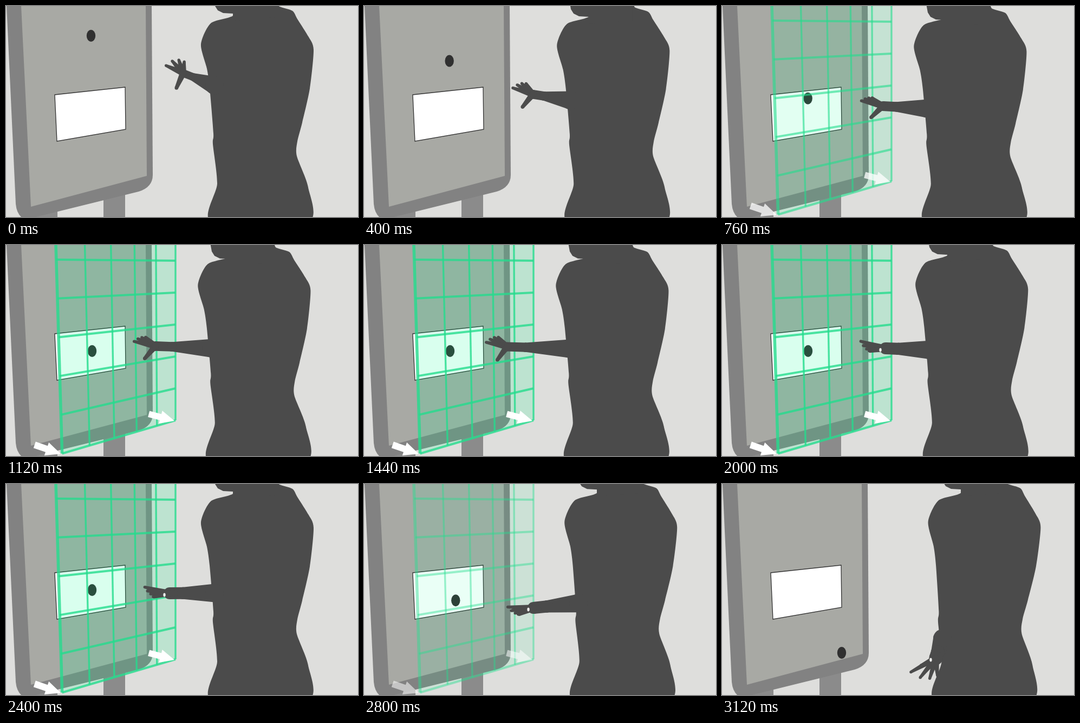
Animation, 650 px wide and 390 px high, one loop 3.16 s. Source, as an HTML page with a canvas:

```html
<!DOCTYPE html>
<html lang="en">
<head>
<meta charset="utf-8">
<title>Touchless board</title>
<style>
html, body { margin: 0; width: 100%; height: 100%; overflow: hidden; background: #dededc; }
canvas { display: block; }
</style>
</head>
<body>
<canvas id="stage" width="650" height="390"></canvas>
<script>
const ctx = document.getElementById('stage').getContext('2d');
const LOOP = 3160, STEP = 40;
const DARK = '#4b4b4b';

// time, body lean, palm x, palm y, hand tilt, finger spread (degrees; negative curls the fingers)
const poses = [
  [0, 0, 327, 124, 24, 24],
  [760, -6, 297, 185, 14, 8],
  [1440, -6, 264, 188, 12, 12],
  [2000, -3, 302, 191, 16, -9],
  [2400, 0, 302, 202, 14, -8],
  [2800, 11, 313, 229, 2, -9],
  [3120, 22, 395, 322, -29, -22]
];

const torso = [
  [505,0], [529,8], [538,23], [558,55], [568,80], [561,152], [547,215], [538,250], [537,277],
  [558,335], [557,400], [380,400], [390,328], [382,255], [383,235], [376,150],
  [371,115], [360,70], [378,31], [419,17], [430,-10], [495,-10]
];
const head = [[-20,-40], [-15,-13], [-10,-5], [0,0], [18,1], [18,14], [98,8], [98,-40]];

const clamp = v => Math.max(0, Math.min(1, v));
const smooth = v => v * v * (3 - 2 * v);
const mix = (a, b, k) => a + (b - a) * k;

// Smooth pose between keys, without overshoot
function poseAt(t) {
  const last = poses.length - 1;
  if (t >= poses[last][0]) return poses[last];
  const i = poses.findIndex((_, n) => t < poses[n + 1][0]);
  const from = poses[i], to = poses[i + 1];
  const h = to[0] - from[0], u = (t - from[0]) / h;
  return from.map((a, c) => {
    const slope = n => (poses[n + 1][c] - poses[n][c]) / (poses[n + 1][0] - poses[n][0]);
    const tangent = n => {
      const p = slope(Math.max(n - 1, 0)), q = slope(Math.min(n, last - 1));
      return p * q > 0 ? 2 * p * q / (p + q) : 0;
    };
    return mix(a, to[c], smooth(u)) + h * u * (1 - u) * ((1 - u) * tangent(i) - u * tangent(i + 1));
  });
}

function poly(points, fill, stroke) {
  ctx.beginPath();
  points.forEach(p => ctx.lineTo(...p));
  ctx.closePath();
  ctx.fillStyle = fill;
  ctx.fill();
  if (stroke) { ctx.strokeStyle = stroke; ctx.lineWidth = 1.3; ctx.stroke(); }
}

// Closed curve through all points
function blob(points, fill) {
  const at = i => points[(i + points.length) % points.length];
  const handle = (i, dir) => [0, 1].map(c => at(i)[c] + dir * (at(i + 1)[c] - at(i - 1)[c]) / 8);
  ctx.beginPath();
  ctx.moveTo(...at(0));
  points.forEach((_, i) => ctx.bezierCurveTo(...handle(i, 1), ...handle(i + 1, -1), ...at(i + 1)));
  ctx.fillStyle = fill;
  ctx.fill();
}

function ellipse(x, y, rx, ry, fill) {
  ctx.beginPath();
  ctx.ellipse(x, y, rx, ry, 0, 0, 7);
  ctx.fillStyle = fill;
  ctx.fill();
}

function line(from, to, width) {
  ctx.lineWidth = width;
  ctx.beginPath();
  ctx.moveTo(...from);
  ctx.lineTo(...to);
  ctx.stroke();
}

// Tapered rounded bar
function limb(x1, y1, r1, x2, y2, r2) {
  const a = Math.atan2(y2 - y1, x2 - x1), sx = -Math.sin(a), sy = Math.cos(a);
  poly([[x1 + sx * r1, y1 + sy * r1], [x2 + sx * r2, y2 + sy * r2],
        [x2 - sx * r2, y2 - sy * r2], [x1 - sx * r1, y1 - sy * r1]], DARK);
  ellipse(x1, y1, r1, r1, DARK);
  ellipse(x2, y2, r2, r2, DARK);
}

function drawBoard() {
  ctx.fillStyle = '#8b8b8b';
  ctx.fillRect(180, 340, 40, 50);
  ctx.fillRect(45, 370, 50, 20);
  ctx.fillStyle = '#828282';
  ctx.beginPath();
  ctx.moveTo(1, 0);
  ctx.lineTo(18, 366);
  ctx.quadraticCurveTo(20, 387, 34, 394);
  ctx.lineTo(55, 390);
  ctx.lineTo(245, 343);
  ctx.quadraticCurveTo(271, 335, 271, 312);
  ctx.lineTo(269, 0);
  ctx.fill();
  poly([[28,0], [46,371], [260,314], [258,0]], '#a8a9a4');
  poly([[90,164], [220,150], [221,228], [94,250]], '#fff', '#333');
}

function drawDot(t) {
  const enter = smooth(clamp(t / 1040)), leave = clamp((t - 2580) / 540) ** 2;
  ellipse(mix(157, 159, enter) + 62 * leave, mix(55, 196, enter) + 116 * leave, 8.2, 11, '#303030');
}

// Point of the tilted grid: column and row run from 0 to 5
function gridPoint(col, row) {
  const u = col / 5, k = 1.28 * u / (1 + 0.28 * u);
  const left = 27 + 71.7 * row, right = 29 + 59 * row;
  return [mix(92 + left * 0.03, 313, k), mix(left, right, k)];
}

function drawArrow(x, y, length, degrees) {
  ctx.save();
  ctx.translate(x, y);
  ctx.rotate(degrees * Math.PI / 180);
  ctx.scale(length, length);
  poly([[-1,-.12], [-.54,-.12], [-.54,-.25], [0,0], [-.54,.25], [-.54,.12], [-1,.12]], '#fff');
  ctx.restore();
}

function drawGrid(alpha) {
  ctx.save();
  ctx.globalAlpha = alpha * 0.15;
  poly([gridPoint(0, -1), gridPoint(0, 5), gridPoint(5, 5), gridPoint(5, -1)], 'rgb(0,255,142)');
  ctx.globalAlpha = alpha * 0.8;
  ctx.strokeStyle = '#25dc8e';
  for (let i = 0; i <= 5; i++) {
    line(gridPoint(i, -1), gridPoint(i, 5), i === 0 ? 5.5 : 3.4);
    line(gridPoint(0, i), gridPoint(5, i), 4);
  }
  ctx.globalAlpha = alpha;
  drawArrow(311, 325, 49, 15);
  drawArrow(101, 386, 51, 19);
  ctx.restore();
}

function drawPerson(t) {
  const [, lean, px, py, tilt, spread] = poseAt(t);
  const bow = 9 + 4 * Math.exp(-0.23 * lean);
  blob(torso.map(([x, y]) => {
    const k = y / 390;
    return [x + lean * (1 - 0.35 * k), y + (bow - 10) / 3 * (1 - k)];
  }), DARK);
  poly(head.map(([x, y]) => [401 + lean + x, bow + y]), DARK);

  const ex = 385 + lean, ey = 60 + 0.7 * py;
  const wx = mix(px, ex, 0.3), wy = mix(py, ey, 0.3), r = 10 - spread * 0.12;
  limb(ex, ey, 17, wx, wy, r);
  limb(wx, wy, r, px, py, r);

  const finger = (degrees, length, tip) => {
    const a = degrees * Math.PI / 180;
    limb(px, py, 6, px - Math.cos(a) * length, py - Math.sin(a) * length, tip);
  };
  for (let i = 0; i < 4; i++) finger(tilt + spread * i, (44 - spread * 0.4) * (1 - 0.13 * i), 2.6);
  finger(tilt - 42 - 2 * spread, 30, 3.3);
  if (spread < 0) ellipse(px - 9.5, py + 3, 2.2, 3.4, '#eeeeec');
}

function draw(now) {
  const t = Math.floor(now % LOOP / STEP) * STEP;
  ctx.fillStyle = '#dededc';
  ctx.fillRect(0, 0, 650, 390);
  drawBoard();
  drawDot(t);
  drawGrid(clamp((t - 540) / 290) * clamp((2930 - t) / 240));
  drawPerson(t);
}

let start;
function tick(now) {
  start ??= now;
  draw(now - start);
  requestAnimationFrame(tick);
}
draw(0);
requestAnimationFrame(tick);
</script>
</body>
</html>
```
